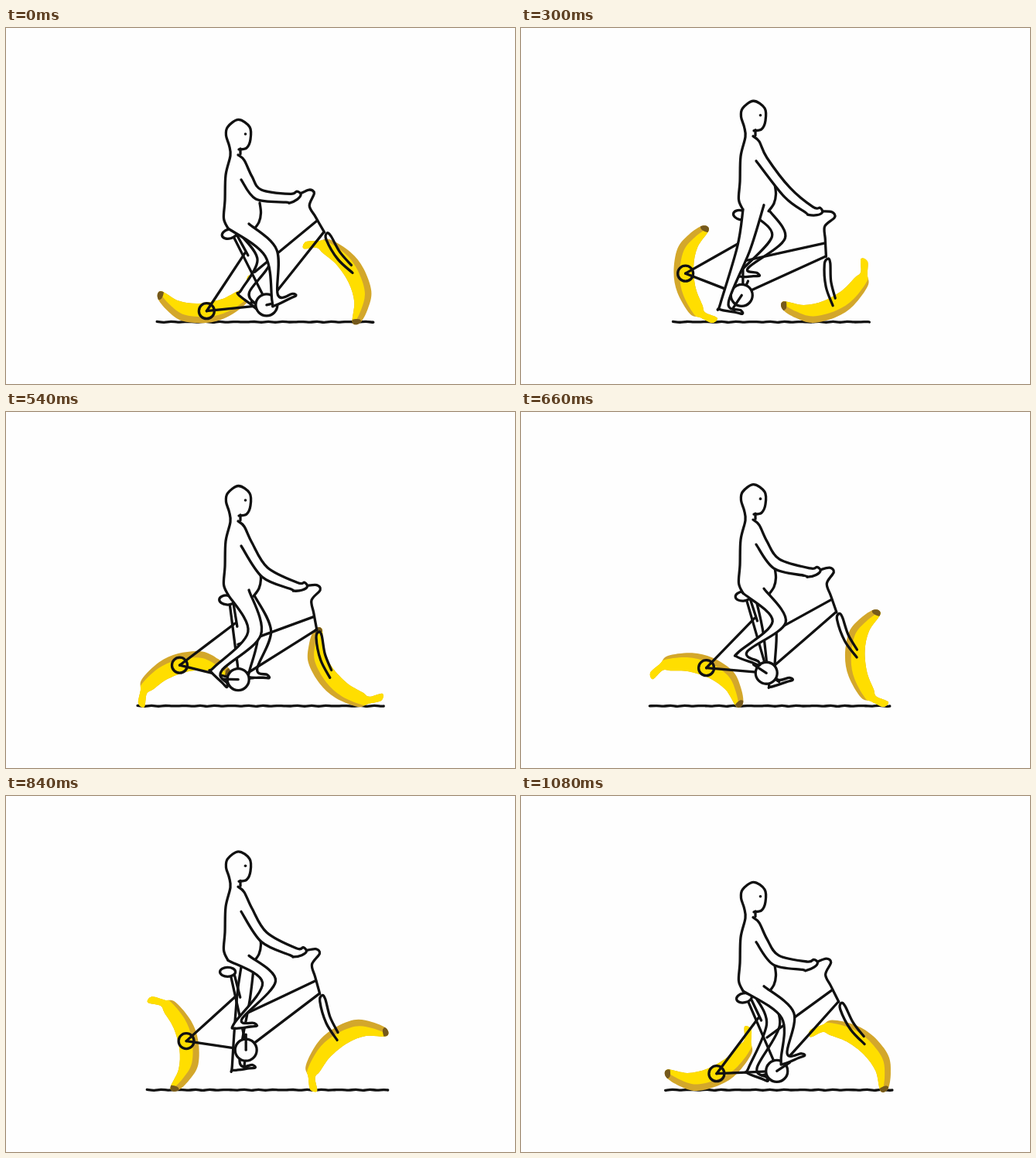
An HTML page with a canvas that plays this animation: 658 px wide and 460 px high, repeating every 1.14 s.

```html
<!DOCTYPE html>
<html>
<head>
<meta charset="utf-8">
<title>Banana bike</title>
<style>
html, body { margin: 0; width: 658px; height: 460px; overflow: hidden; background: #fefefe; }
canvas { display: block; }
</style>
</head>
<body>
<canvas id="stage" width="658" height="460"></canvas>
<script>
const ctx = document.getElementById('stage').getContext('2d');
const PAPER = '#fefefe', INK = '#111', YELLOW = '#ffde00', GOLD = '#d3a72b', BROWN = '#75591c';
const STEP = 60, COUNT = 19, GROUND = 381, BASE = 195;

// Pose keys. Each row: head height above seat, elbow x, elbow y below head top,
// then near leg and far leg: knee (from seat), heel and toe (from crank).
const KEY_AT = [0, 2, 5, 9, 11, 14, 18];
const POSES = [
  [148, 330, 91, 53, 25, 10, 1, 38, -12, 44, 34, -37, -14, -13, 5],
  [151, 331, 101, 39, 31, 6, 20, 35, 10, 49, 29, -37, -24, -12, -11],
  [148, 348, 113, 3, 43, -29, 18, 1, 24, 48, 29, -1, -24, 23, -25],
  [148, 338, 106, 35, 43, -36, -11, -15, 10, 48, 41, 14, -3, 40, -2],
  [145, 334, 97, 46, 33, -38, -21, -9, -10, 34, 47, 5, 18, 34, 9],
  [156, 337, 105, 53, 13, -14, -28, 14, -31, 20, 33, -17, 26, 12, 23],
  [150, 333, 95, 56, 23, 8, -9, 36, -20, 37, 35, -39, 2, -12, 13]
];

// Banana lying on its back, tip at the left, stem at the right.
const BANANA = [[-56, 0], [-62, 8], [-52, 26], [-35, 42], [-5, 49], [22, 46], [50, 32], [56, 19],
  [64, 4], [58, -3], [50, 12], [40, 15], [18, 22], [-10, 23], [-35, 16]];
const HUB = [-2, 34];

const add = (p, q, k = 1) => [p[0] + q[0] * k, p[1] + q[1] * k];
const sub = (p, q) => add(p, q, -1);
const unit = p => { const d = Math.hypot(...p) || 1; return [p[0] / d, p[1] / d]; };
const normal = p => [p[1], -p[0]];
const turn = ([x, y], a) => [x * Math.cos(a) - y * Math.sin(a), x * Math.sin(a) + y * Math.cos(a)];

function poseAt(i) {
  const n = KEY_AT.length;
  const time = k => KEY_AT[(k + n) % n] + Math.floor(k / n) * COUNT;
  const row = k => POSES[(k + n) % n];
  let k = n - 1;
  while (KEY_AT[k] > i) k--;
  const span = time(k + 1) - time(k), u = (i - time(k)) / span;
  return row(k).map((v, c) => {
    const slope = j => (row(j + 1)[c] - row(j - 1)[c]) / (time(j + 1) - time(j - 1)) * span;
    const w = row(k + 1)[c], u2 = u * u, u3 = u2 * u;
    return v * (2 * u3 - 3 * u2 + 1) + w * (3 * u2 - 2 * u3) +
      slope(k) * (u3 - 2 * u2 + u) + slope(k + 1) * (u3 - u2);
  });
}

function curve(pts, closed) {
  const n = pts.length, path = new Path2D();
  const at = k => closed ? pts[(k + n) % n] : pts[Math.max(0, Math.min(n - 1, k))];
  path.moveTo(...pts[0]);
  for (let k = 0; k < (closed ? n : n - 1); k++) {
    const p = at(k), q = at(k + 1);
    path.bezierCurveTo(...add(p, sub(q, at(k - 1)), 1 / 6), ...add(q, sub(at(k + 2), p), -1 / 6), ...q);
  }
  return path;
}

function ink(pts, filled, closed) {
  const path = curve(pts, closed);
  if (filled) { ctx.fillStyle = PAPER; ctx.fill(path); }
  ctx.stroke(path);
}

function ring(center, rx, ry, tilt, filled) {
  ctx.beginPath();
  ctx.ellipse(...center, rx, ry, tilt, 0, Math.PI * 2);
  if (filled) { ctx.fillStyle = PAPER; ctx.fill(); }
  ctx.stroke();
}

const spun = angle => BANANA.map(p => turn(sub(p, HUB), angle));
const hubHeight = pts => GROUND - Math.max(...pts.map(p => p[1]));

function banana(hub, angle) {
  const path = curve(BANANA, true);
  ctx.save();
  ctx.translate(...hub);
  ctx.rotate(angle);
  ctx.translate(-HUB[0], -HUB[1]);
  ctx.fillStyle = GOLD;
  ctx.fill(path);
  ctx.clip(path);
  ctx.translate(4, -7.5);
  ctx.fillStyle = YELLOW;
  ctx.fill(path);
  ctx.translate(-4, 7.5);
  // The shifted fill leaves the stem and the inner edge open.
  ctx.fillRect(53, -6, 14, 27);
  ctx.fillStyle = BROWN;
  ctx.fill(curve([[-66, 8], [-56, -4], [-53, 1], [-58, 10]], true));
  ctx.restore();
}

function leg(front, back, knee, heel, toe) {
  const foot = unit(sub(toe, heel)), up = normal(foot);
  const ankle = add(add(heel, foot, 5), up, 9);
  const hip = [(front[0] + back[0]) / 2, (front[1] + back[1]) / 2];
  const out = unit(add(normal(unit(sub(knee, hip))), normal(unit(sub(ankle, knee)))));
  ink([front, add(knee, out, 9), add(add(heel, foot, 10), up, 11), add(add(toe, foot, -3), up, 4),
    toe, add(toe, foot, -8), heel, add(heel, up, 7), add(knee, out, -8), back], true);
}

function draw(i) {
  const spin = i / COUNT * Math.PI * 2;
  const rearAngle = spin - 0.15, frontAngle = spin - 2.13;
  const rearPts = spun(rearAngle), frontPts = spun(frontAngle);
  const rearY = hubHeight(rearPts), frontY = hubHeight(frontPts);
  const tilt = Math.asin((frontY - rearY) / BASE);
  const rear = [286.5 - 10 * tilt - turn([54, -89], tilt)[0], rearY];
  const bike = (x, y) => add(rear, turn([x, y], tilt));
  const front = bike(BASE, 0), seat = bike(54, -89), crank = bike(77, 12);

  const [rise, elbowX, elbowY, ...legs] = poseAt(i);
  const top = seat[1] - rise;
  const body = (x, y) => [x, top + y];
  const joints = k => [
    add(seat, legs.slice(k, k + 2)), add(crank, legs.slice(k + 2, k + 4)), add(crank, legs.slice(k + 4, k + 6))
  ];
  const near = joints(0), far = joints(6);
  const pedal = leg => add(crank, unit(sub(add(leg[1], sub(leg[2], leg[1]), 0.5), crank)), 20);

  ctx.fillStyle = PAPER;
  ctx.fillRect(0, 0, 658, 460);
  ctx.strokeStyle = INK;
  ctx.lineWidth = 3.3;
  ctx.lineCap = ctx.lineJoin = 'round';

  // Ground reaches as far as the two wheels.
  const left = rear[0] + Math.min(...rearPts.map(p => p[0])) - 1;
  const right = front[0] + Math.max(...frontPts.map(p => p[0])) + 2;
  const ground = [];
  for (let x = left; x < right; x += 9) ground.push([x, 379.8 + 0.5 * Math.sin(x * 1.7 + i * 2)]);
  ground.push([right, 380]);
  ink(ground);

  banana(rear, rearAngle);
  banana(front, frontAngle);

  leg(body(321, 142), body(304, 150), ...far);

  // Bike
  ink([crank, pedal(far)]);
  ink([rear, bike(67, -60)]);
  ink([rear, bike(64, 10)]);
  ink([bike(58, -84), bike(76, 0)]);
  ink([bike(63, -84), bike(70, -56)]);
  ink([bike(73, -33), bike(168, -77)]);
  ink([bike(88, 3), bike(172, -60)]);
  ink([bike(155, -116), bike(168, -118), bike(173, -112), bike(163, -98), bike(167, -82), bike(173, -60)]);
  ink([front, bike(181, -22), bike(173, -50), bike(176, -58), bike(180, -53), bike(186, -30), bike(196, -10)]);
  ring(rear, 10, 10, 0);
  ring(crank, 14, 14, 0, true);
  ink([crank, pedal(near)]);
  ring(seat, 10, 6, tilt, true);

  // Torso and head
  ctx.fillStyle = PAPER;
  ctx.fill(curve([body(290, 46), body(303, 44), body(317, 75), body(328, 104), body(328, 125),
    body(314, 143), body(287, 140), body(282, 105), body(284, 72)], true));
  ink([body(328, 108), body(329.5, 121), body(327, 133), body(320, 143)]);
  ink([body(301, 39), body(311, 37), body(316, 26), body(315, 10), body(300.5, 0.5), body(286.5, 10),
    body(284.5, 21), body(288.5, 34), body(290, 47), body(284, 72), body(283, 105), body(281.5, 128),
    body(287, 141)], true);
  ctx.fillStyle = INK;
  ctx.beginPath();
  ctx.arc(...body(309.5, 19), 1.8, 0, 7);
  ctx.fill();

  leg(body(314, 135), body(287, 141), ...near);

  // Arm holding the bar
  ink([body(303, 38), body(303, 45)]);
  const arm = [body(300, 46), body(308, 53), body(318, 74), body(elbowX, elbowY),
    bike(143, -119), bike(152, -120), bike(156, -115), bike(150, -110), bike(139, -108),
    bike(135, -110), body(elbowX - 7, elbowY + 12), body(304, 78)];
  ink(arm, true);
}

function tick(now) {
  draw(Math.floor(now / STEP) % COUNT);
  requestAnimationFrame(tick);
}
draw(0);
requestAnimationFrame(tick);
</script>
</body>
</html>
```
